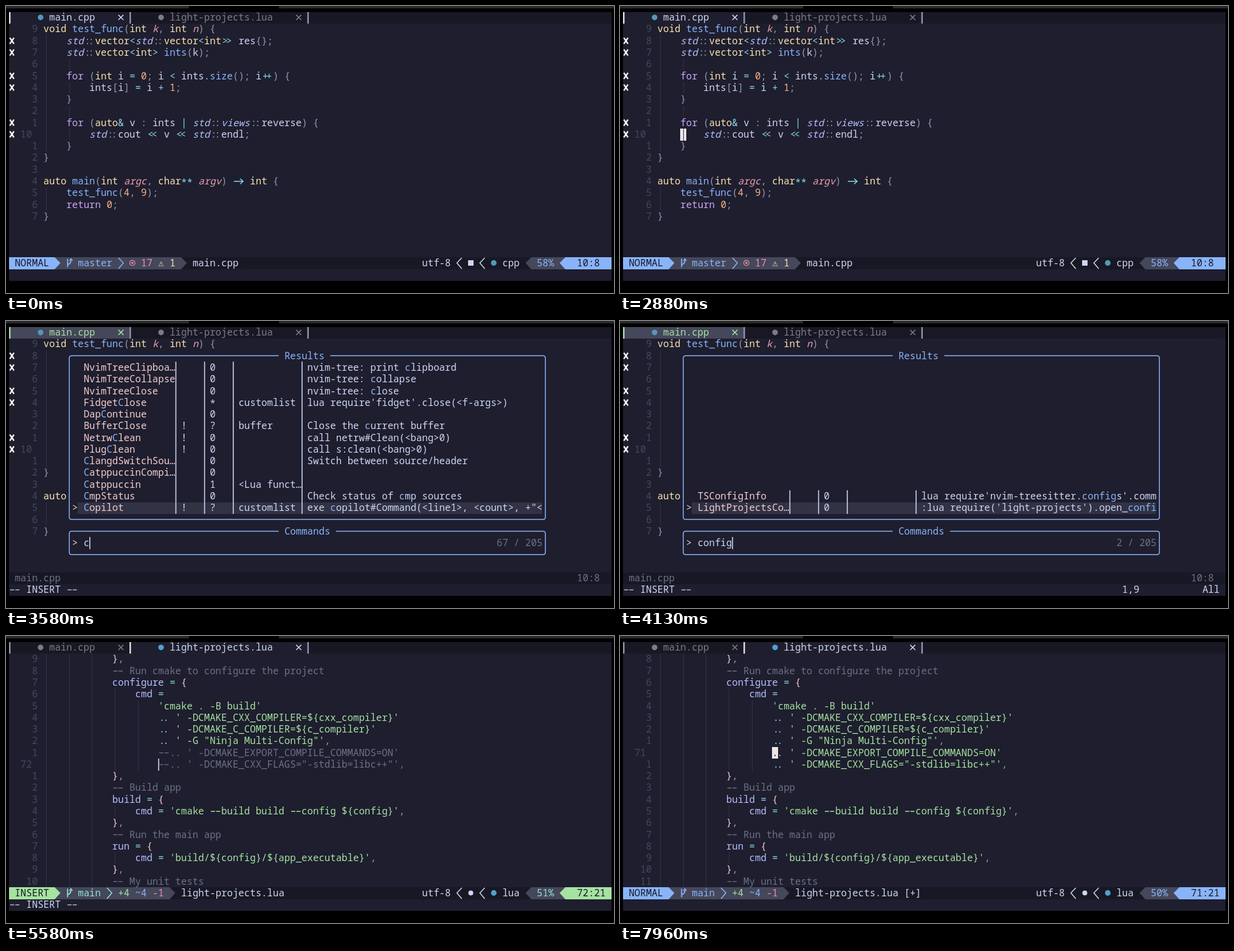
An HTML page for the animation above (8 s loop, 1000 by 473 pixels).

```html
<!DOCTYPE html>
<html lang="en">
<head>
<meta charset="utf-8">
<title>Editor session</title>
<style>
  html, body { margin: 0; width: 100%; height: 100%; overflow: hidden; background: #000; }
  svg { display: block; width: 1000px; height: 473px; }
  text {
    font: 15.725px "Noto Sans Mono", "DejaVu Sans Mono", monospace;
    font-variant-ligatures: none;
    white-space: pre;
  }
  .i { font-style: italic; }
  .t { letter-spacing: -3px; transform: translateX(1.5px); }
  .low { transform: translateY(2.6px); }
</style>
</head>
<body>
<svg id="stage" viewBox="0 0 1000 473" xml:space="preserve"></svg>
<script>
const LOOP = 8000, CW = 9.435, CH = 19.27, COLS = 105;
const X = c => 5 + c * CW;
const Y = r => Math.round(9.6 + r * CH);
const MID = r => 18.8 + r * CH;

const C = {
  base: '#1e1e2e', mantle: '#181825', select: '#313244', surface: '#45475a', comment: '#6c7086',
  punct: '#9399b2', text: '#cdd6f4', blue: '#89b4fa', green: '#a6e3a1', yellow: '#f9e2af',
  peach: '#fab387', mauve: '#cba6f7', maroon: '#eba0ac', red: '#f38ba8', sky: '#89dceb',
  teal: '#94e2d5', lavender: '#b4befe', flamingo: '#f2cdcd', cursor: '#ebe5e6',
  idle: '#7b7c88', icon: '#519aba', strip: '#29292a'
};

// ---------- drawing helpers ----------
const esc = s => s.replace(/&/g, '&amp;').replace(/</g, '&lt;');
const rect = (x, y, w, h, fill) => `<rect x="${x}" y="${y}" width="${w}" height="${h}" fill="${fill}"/>`;
const cells = (c, r, w, h, fill) => {
  const x = Math.round(X(c));
  return rect(x, Y(r), Math.round(X(c + w)) - x, Y(r + h) - Y(r), fill);
};
const stroke = (d, color, w = 1.4) => `<path d="${d}" fill="none" stroke="${color}" stroke-width="${w}"/>`;
const fillPath = (d, color) => `<path d="${d}" fill="${color}"/>`;
const dot = (c, r, color, rad = 4.6) => `<circle cx="${X(c + .5)}" cy="${MID(r)}" r="${rad}" fill="${color}"/>`;
const bar = (c, r, color, w = 1.6) => rect(X(c), Y(r), w, Y(r + 1) - Y(r), color);

// Double dashes and arrows sit close together, as ligatures do.
function ligature(c, r, kind, color) {
  const a = X(c) + 1.8, m = X(c + 1), b = X(c + 2) - 1.8, y = MID(r) + .4;
  const d = kind === '->'
    ? `M${a} ${y}H${b}M${b - 5} ${y - 4.5}L${b} ${y}L${b - 5} ${y + 4.5}`
    : `M${a} ${y}H${m - .9}M${m + .9} ${y}H${b}`;
  return stroke(d, color);
}

function text(c, r, s, color, cls = '') {
  let extra = '';
  s = s.replace(/--|->/g, (m, i) => {
    extra += ligature(c + i, r, m, color);
    return '  ';
  });
  return `<text x="${X(c)}" y="${MID(r) + 5.4}" fill="${color}" class="${cls}">${esc(s)}</text>${extra}`;
}

function cross(x, y, w, h, color, width) {
  return stroke(`M${x - w} ${y - h}L${x + w} ${y + h}M${x + w} ${y - h}L${x - w} ${y + h}`, color, width);
}

// ---------- syntax colours: [pattern, colour, class] ----------
const grammar = rules => ({ rules, re: new RegExp(rules.map(r => `(${r[0]})`).join('|'), 'g') });

const CPP = grammar([
  ['\\b(?:void|int|auto|char|vector)\\b', C.yellow],
  ['\\b(?:for|return)\\b', C.mauve],
  ['\\b\\w+(?=\\()', C.blue],
  ['\\b(?:std|views)\\b', C.lavender, 'i'],
  ['\\b(?:argc|argv|k(?=,)|n(?=\\)))', C.maroon, 'i'],
  ['\\d+', C.peach],
  ['\\w+', C.text],
  ['::', C.punct, 't'],
  ['<<|>>|\\+\\+', C.sky, 't'],
  ['\\*+', C.sky, 'low'],
  ['->|[<>=+|&.]', C.sky],
  ['[^\\s\\w]', C.punct]
]);
const LUA = grammar([
  ['--.*', C.comment],
  ["'[^']*'", C.green],
  ['[{}]', C.flamingo],
  ['\\.\\.', C.sky, 't'],
  ['[=-]', C.sky],
  ['\\w+', C.lavender],
  [',', C.punct]
]);

function code(c, r, line, g) {
  let out = '';
  for (const m of line.matchAll(g.re)) {
    const [, color, cls] = g.rules[m.slice(1).findIndex(v => v !== undefined)];
    out += text(c + m.index, r, m[0], color, cls);
  }
  return out;
}

// ---------- documents ----------
const cppLines = `void test_func(int k, int n) {
    std::vector<std::vector<int>> res{};
    std::vector<int> ints(k);
        
    for (int i = 0; i < ints.size(); i++) {
        ints[i] = i + 1;
    }
        
    for (auto& v : ints | std::views::reverse) {
        std::cout << v << std::endl;
    }
}

auto main(int argc, char** argv) -> int {
    test_func(4, 9);
    return 0;
}`.split('\n');
const errorRows = [2, 3, 5, 6, 9, 10];

const luaLines = s => `},
-- Run cmake to configure the project
configure = {
    cmd =
        'cmake . -B build'
        .. ' -DCMAKE_CXX_COMPILER=\${cxx_compiler}'
        .. ' -DCMAKE_C_COMPILER=\${c_compiler}'
        .. ' -G "Ninja Multi-Config"',
        ${'-'.repeat(s.dash71)}.. ' -DCMAKE_EXPORT_COMPILE_COMMANDS=ON'
        ${'-'.repeat(s.dash72)}.. ' -DCMAKE_CXX_FLAGS="-stdlib=libc++"',
},
-- Build app
build = {
    cmd = 'cmake --build build --config \${config}',
},
-- Run the main app
run = {
    cmd = 'build/\${config}/\${app_executable}',
},
-- My unit tests`.split('\n').map(l => ' '.repeat(12) + l);

// ---------- command picker: name, bang, nargs, complete, description; ^ starts a match ----------
const commands = `NvimTreeClipboa…||0||nvim-tree: print ^clipboard
NvimTreeCollapse||0||nvim-tree: ^collapse
NvimTreeClose||0||nvim-tree: ^close
Fidget^Close||*|customlist|lua require'fidget'.close(<f-args>)
Dap^Continue||0||
BufferClose|!|?|buffer|Close the ^current buffer
Netrw^Clean|!|0||call netrw#Clean(<bang>0)
Plug^Clean|!|0||call s:clean(<bang>0)
^ClangdSwitchSou…||0||Switch between source/header
^CatppuccinCompi…||0||
^Catppuccin||1|<Lua funct…|
^CmpStatus||0||Check status of ^cmp sources
^Copilot|!|?|customlist|exe ^copilot#Command(<line1>, <count>, +"<`.split('\n');
const configCommands = [
  "TSConfigInfo||0||lua require'nvim-treesitter.^configs'.comm",
  "LightProjectsCo…||0||:lua require('light-projects').open_^confi"
];
const hits = ['205', '67', '24', '3', '2', '2', '2'];

function found(q) {
  if (q.length < 2) return commands;
  if (q.length < 3) return commands.filter(l => /c.*o/i.test(l.split('|')[0]));
  return q.length < 4 ? [commands[4], ...configCommands] : configCommands;
}

function marked(c, r, s, color, n) {
  const at = s.indexOf('^');
  if (at < 0 || !n) return text(c, r, s.replace('^', ''), color);
  const plain = s.replace('^', '');
  return text(c, r, plain.slice(0, at), color) +
    text(c + at, r, plain.slice(at, at + n), C.blue) +
    text(c + at + n, r, plain.slice(at + n), color);
}

function frame(top, bottom, title) {
  const l = X(10.5), r = X(93.5), t = MID(top), b = MID(bottom), k = 4;
  const gap = X(47), end = X(49 + title.length);
  return cells(10, top, 84, bottom - top + 1, C.base) +
    stroke(`M${gap} ${t}H${l + k}Q${l} ${t} ${l} ${t + k}V${b - k}Q${l} ${b} ${l + k} ${b}` +
      `H${r - k}Q${r} ${b} ${r} ${b - k}V${t + k}Q${r} ${t} ${r - k} ${t}H${end}`, C.blue, 1.5) +
    text(48, top, title, C.blue);
}

function picker(q) {
  const rows = found(q), first = 16 - rows.length, count = hits[q.length] + ' / 205';
  let out = frame(2, 16, 'Results') + frame(17, 19, 'Commands') + cells(12, 15, 81, 1, C.select);
  rows.forEach((line, i) => {
    const r = first + i, [name, bang, nargs, kind, info] = line.split('|');
    out += marked(13, r, name, C.flamingo, q.length) + text(30, r, bang, C.text) +
      text(35, r, nargs, C.text, nargs === '*' ? 'low' : '') + text(40, r, kind, C.text) +
      marked(52, r, info, C.text, q.length) +
      [29, 34, 39, 51].map(c => bar(c, r, C.text)).join('');
  });
  return out + text(11, 15, '>', C.flamingo) + text(11, 18, '>', C.flamingo) +
    text(13, 18, q, C.text) + bar(13 + q.length, 18, C.text) +
    text(93 - count.length, 18, count, C.comment);
}

// ---------- tab line and status line ----------
function tab(c, width, name, active, color, iconColor) {
  const green = color === C.green, fg = active ? color : C.idle;
  const edge = active ? (green ? color : C.cursor) : C.punct;
  return (active ? cells(c, 0, width, 1, green ? C.surface : C.base) : '') +
    dot(c + 5, 0, active ? iconColor : C.idle) + text(c + 7, 0, name, fg) +
    cross(X(c + width - 1.5), MID(0), 4.2, 4.2, fg, 1.5) + bar(c, 0, edge, 2.4);
}

function tabs(s) {
  const lua = s.view === 'lua';
  return cells(0, 0, COLS, 1, C.mantle) +
    tab(0, 21, 'main.cpp', !lua, s.query !== null ? C.green : C.text, C.icon) +
    tab(21, 31, 'light-projects.lua', lua, C.text, '#51a0cf') + bar(52, 0, C.punct, 2.4);
}

const wedge = (c, dir, color) => {
  const a = Math.round(X(dir > 0 ? c : c + 1));
  return fillPath(`M${a} ${Y(21)}L${a + dir * CW} ${MID(21)}L${a} ${Y(22)}Z`, color);
};
const chevron = (c, dir, color) => {
  const x = X(c + .5) - dir * 4;
  return stroke(`M${x} ${Y(21) + 1}L${x + dir * 8} ${MID(21)}L${x} ${Y(22) - 1}`, color, 1.5);
};

function branchIcon(color) {
  const x = X(10) + 2, y = MID(21);
  return stroke(`M${x} ${y - 7}V${y + 7}M${x} ${y + 3}Q${x + 5.5} ${y + 1} ${x + 5.5} ${y - 5}`, color, 1.8) +
    stroke(`M${x + 3} ${y - 3.5}L${x + 5.5} ${y - 7}L${x + 8} ${y - 3.5}`, color, 1.4);
}

function errorIcon(c, color) {
  const x = X(c + .5), y = MID(21);
  return `<circle cx="${x}" cy="${y}" r="4.3" fill="none" stroke="${color}" stroke-width="1.2"/>` +
    cross(x, y, 1.7, 1.7, color, 1.2);
}

function status(s) {
  const R = 21, bg = cells(0, R, COLS, 1, C.mantle);
  if (s.query !== null) return bg + text(1, R, 'main.cpp', C.comment) + text(99, R, '10:8', C.comment);

  const lua = s.view === 'lua', insert = s.mode === 'INSERT';
  const main = insert ? C.green : C.blue, side = insert ? C.teal : C.blue;
  const branch = lua ? 'main' : 'master', end = lua ? 28 : 30, sep = 13 + branch.length;
  const info = lua
    ? text(19, R, '+4', C.green) + text(22, R, '~4', C.blue) + text(25, R, '-1', C.red)
    : errorIcon(21, C.red) + text(23, R, '17', C.red) + text(26, R, '⚠', C.yellow) + text(28, R, '1', C.yellow);
  const file = lua ? 'light-projects.lua' + (s.dirty ? ' [+]' : '') : 'main.cpp';
  const system = lua ? dot(80, R, C.text, 4) : rect(X(80.5) - 4.5, MID(R) - 4.5, 9, 9, C.text);

  return bg + cells(8, R, end - 8, 1, C.surface) + cells(0, R, 8, 1, main) +
    wedge(8, 1, main) + wedge(end, 1, C.surface) + text(1, R, s.mode, C.mantle) +
    branchIcon(side) + text(12, R, branch, side) + chevron(sep, 1, side) + info +
    text(end + 2, R, file, C.text) + text(72, R, 'utf-8', C.text) +
    chevron(78, -1, C.text) + system + chevron(82, -1, C.text) +
    dot(84, R, lua ? '#51a0cf' : C.icon) + text(86, R, lua ? 'lua' : 'cpp', C.text) +
    cells(91, R, 6, 1, C.surface) + wedge(90, -1, C.surface) +
    text(92, R, lua ? (s.line === 72 ? '51%' : '50%') : '58%', side) +
    cells(97, R, 8, 1, main) + wedge(96, -1, main) +
    text(99, R, lua ? `${s.line}:${s.col}` : '10:8', C.mantle);
}

// ---------- buffer ----------
function buffer(s) {
  const lua = s.view === 'lua', lines = lua ? luaLines(s) : cppLines;
  const current = lua ? s.line - 62 : 10, cursorCol = lua ? s.col + 5 : 10;
  const block = s.cursor && s.mode === 'NORMAL' && s.query === null;
  let out = block ? cells(cursorCol, current, 1, 1, C.cursor) : '';
  lines.forEach((line, i) => {
    const r = i + 1, indent = line.search(/\S|$/);
    const num = String(r === current ? (lua ? s.line : 10) : Math.abs(r - current));
    out += text(r === current ? 2 : 5 - num.length, r, num, C.surface);
    for (let g = 0; g < indent; g += 4) out += rect(Math.floor(X(6.5 + g)), Y(r), 1, Y(r + 1) - Y(r), C.select);
    if (!lua && errorRows.includes(r)) out += cross(X(.5), MID(r), 3.4, 5, '#fff', 2.3);
    out += code(6, r, line, lua ? LUA : CPP);
  });
  if (block && lua) {
    const ch = lines[current - 1][cursorCol - 6];
    if (ch !== ' ') out += cells(cursorCol, current, 1, 1, C.cursor) + text(cursorCol, current, ch, C.base);
  }
  if (s.cursor && s.mode === 'INSERT' && lua) out += bar(cursorCol, current, C.text);
  return out;
}

function screen(s) {
  let out = rect(0, 0, 301, 4, C.strip) + rect(449, 0, 551, 4, C.strip) +
    cells(0, 0, COLS, 23, C.base) + tabs(s) + buffer(s) + status(s);
  if (s.query !== null) {
    out += picker(s.query);
    if (s.query.length > 2) out += text(87, 22, `1,${s.query.length + 3}`, C.text) + text(101, 22, 'All', C.text);
  }
  return out + text(0, 22, s.msg, C.text);
}

// ---------- timeline: each step changes part of the state ----------
const INS = '-- INSERT --';
const start = {
  view: 'cpp', query: null, mode: 'NORMAL', line: 72, col: 20,
  dash71: 2, dash72: 2, dirty: false, msg: '', blink: null
};
const steps = [
  [290, { blink: 290 }],
  [3210, { query: '', msg: INS }],
  [3500, { query: 'c' }],
  [3880, { query: 'co' }],
  [3920, { query: 'con' }],
  [4000, { query: 'conf' }],
  [4040, { query: 'confi' }],
  [4130, { query: 'config' }],
  [4460, { view: 'lua', query: null, msg: '', blink: 4460 }],
  [4880, { col: 21, blink: 4960 }],
  [5380, { mode: 'INSERT', msg: INS, blink: 5540 }],
  [5960, { dash72: 1, dirty: true, blink: 6040 }],
  [6130, { dash72: 0, blink: 6210 }],
  [6290, { mode: 'NORMAL', col: 20, msg: '', blink: 6370 }],
  [6420, { msg: 'AutoSave: saved at 10:34:20' }],
  [6540, { line: 71, blink: 6620 }],
  [6790, { col: 21, blink: 6880 }],
  [7080, { dash71: 1, blink: 7160 }],
  [7290, { dash71: 0, blink: 7460 }],
  [7710, { msg: '' }]
];

function stateAt(t) {
  const s = Object.assign({}, start, ...steps.filter(([at]) => at <= t).map(([, change]) => change));
  s.cursor = s.blink !== null && (t < s.blink || Math.floor((t - s.blink) / 250) % 2 === 0);
  return s;
}

const stage = document.getElementById('stage');
let shown = '';
function tick() {
  const s = stateAt(performance.now() % LOOP), key = JSON.stringify(s);
  if (key !== shown) {
    shown = key;
    stage.innerHTML = screen(s);
  }
  requestAnimationFrame(tick);
}
tick();
</script>
</body>
</html>
```
